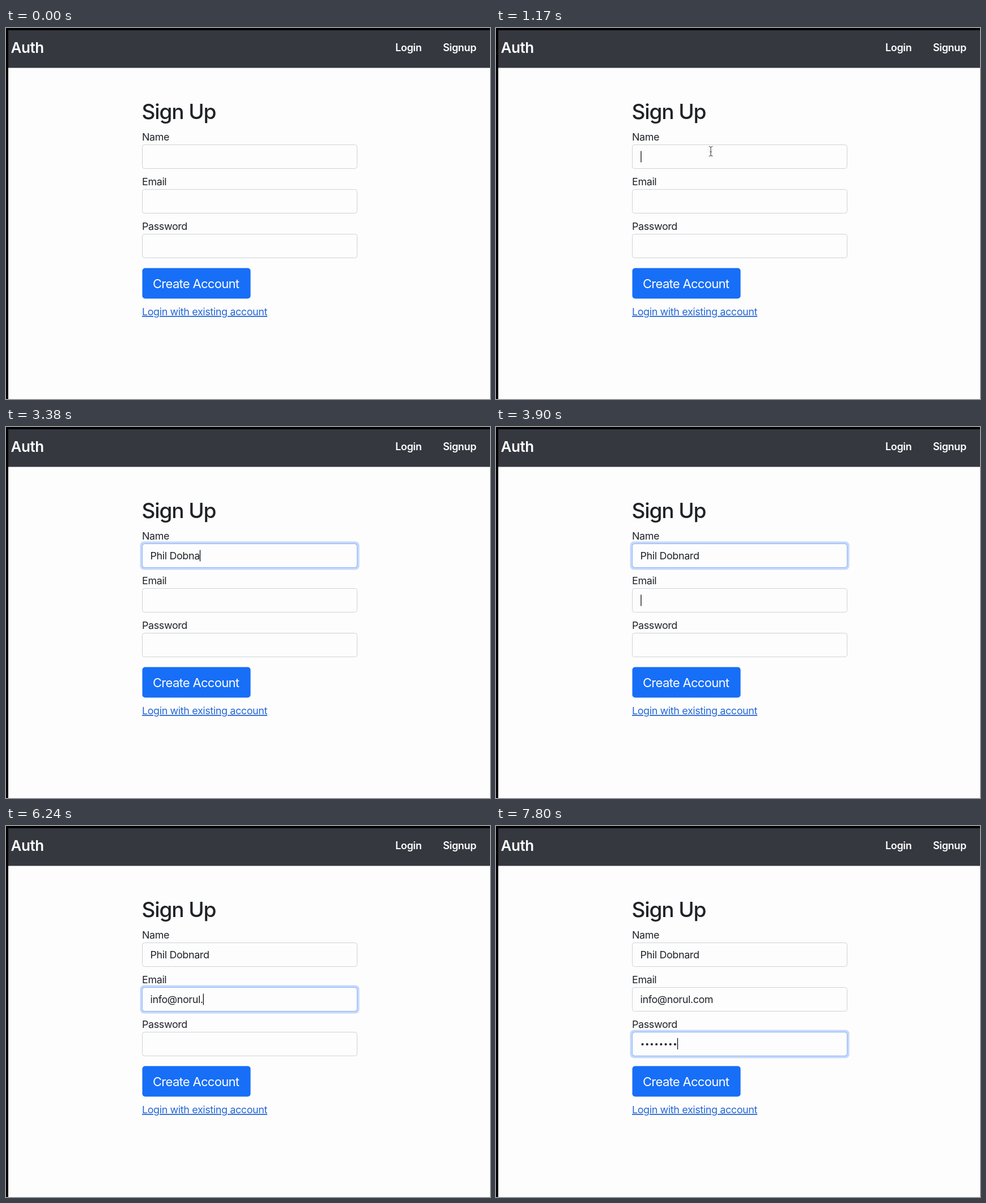
These frames come from a looping animation (854 by 656 pixels, 8000 ms). An HTML page:

```html
<!DOCTYPE html>
<html lang="en">
<head>
<meta charset="utf-8">
<title>Sign Up</title>
<style>
  html, body { margin: 0; width: 100%; height: 100%; overflow: hidden; background: #fdfdfd; }
  svg { display: block; width: 854px; height: 656px; }
  text { font: 400 17.9px Inter, "Open Sans", sans-serif; letter-spacing: -.36px; fill: #1f2328; white-space: pre; }
  .brand { font-size: 26px; font-weight: 600; letter-spacing: -.4px; fill: #fff; }
  .nav { font-size: 18px; font-weight: 600; fill: #fff; }
  .title { font-size: 37px; font-weight: 500; letter-spacing: -1.1px; }
  .button { font-size: 22px; letter-spacing: -.7px; fill: #fff; }
  .link { fill: #2367d6; text-decoration: underline; }
</style>
</head>
<body>
<svg id="stage" viewBox="0 0 854 656">
  <rect width="854" height="656" fill="#fdfdfd"/>
  <rect width="854" height="4" fill="#000"/>
  <rect width="4" height="656" fill="#000"/>
  <rect x="4" y="4" width="850" height="66.5" fill="#35383f"/>
  <text class="brand" x="8.5" y="44">Auth</text>
  <text class="nav" x="687" y="41">Login</text>
  <text class="nav" x="771" y="41">Signup</text>
  <text class="title" x="239.5" y="161">Sign Up</text>
  <g id="form"></g>
  <rect x="240.5" y="424.5" width="191" height="54" rx="5" fill="#176ef7"/>
  <text class="button" x="259" y="460">Create Account</text>
  <text class="link" x="240" y="508">Login with existing account</text>
  <rect id="caret" width="1.3" fill="#111"/>
  <g id="pointer">
    <path id="arrow" d="M0 0V17L4 13.4L6.6 19.4L9.4 18.2L6.8 12.4H12.2Z" fill="#000" stroke="#fff" stroke-width="1.2"/>
    <path id="beam" d="M-3.5 -8.5Q0 -8.5 0 -6Q0 -8.5 3.5 -8.5M0 -6V6M-3.5 8.5Q0 8.5 0 6Q0 8.5 3.5 8.5M-2 1H2" fill="none" stroke="#555" stroke-width="1.2"/>
  </g>
</svg>
<script>
const LOOP = 8000, STEP = 130, FADE = 130, BLINK = 520;
const $ = id => document.getElementById(id);

function add(tag, attrs, text = "") {
  const el = document.createElementNS("http://www.w3.org/2000/svg", tag);
  for (const key in attrs) el.setAttribute(key, attrs[key]);
  el.textContent = text;
  return $("form").appendChild(el);
}

// keys: [time, number of characters typed so far]
const fields = [
  { label: "Name", top: 206, value: "Phil Dobnard", from: 1170, to: 3900,
    keys: [[2210, 1], [2340, 2], [2470, 3], [2600, 4], [2730, 5], [2990, 6],
           [3120, 7], [3250, 9], [3380, 10], [3510, 11], [3640, 12]] },
  { label: "Email", top: 285, value: "info@norul.com", from: 3900, to: 6760,
    keys: [[4680, 1], [4940, 2], [5070, 3], [5200, 4], [5460, 5], [5720, 6],
           [5850, 8], [5980, 10], [6240, 11], [6370, 12], [6500, 13], [6630, 14]] },
  { label: "Password", top: 364, secret: true, from: 6760, to: 9000,
    keys: [[7020, 1], [7280, 2], [7410, 4], [7540, 5], [7670, 7], [7800, 8]] }
];

for (const f of fields) {
  const box = { x: 240.5, y: f.top + .5, width: 379, height: 42, rx: 4 };
  f.ring = add("rect", { x: 236.5, y: f.top - 3.5, width: 387, height: 50, rx: 7, fill: "#c5d8fc" });
  add("rect", { ...box, fill: "#fdfdfd", stroke: "#cfd2d7" });
  f.edge = add("rect", { ...box, fill: "none", stroke: "#8db4f5" });
  add("text", { x: 240, y: f.top - 7 }, f.label);
  if (f.secret) {
    f.dots = Array.from({ length: 8 }, (_, i) =>
      add("circle", { cx: 258.5 + i * 8.2, cy: f.top + 22, r: 2.1, fill: "#1f2328" }));
  } else {
    f.text = add("text", { x: 254.5, y: f.top + 28 });
  }
}

const clamp = v => Math.max(0, Math.min(1, v));

function drawField(f, t) {
  const focus = clamp((t - f.from) / FADE) * (1 - clamp((t - f.to) / FADE));
  f.ring.setAttribute("opacity", focus);
  f.edge.setAttribute("opacity", focus);

  const [last, count] = f.keys.filter(k => k[0] <= t).pop() || [f.from, 0];
  let end = 255.3;
  if (f.secret) {
    f.dots.forEach((d, i) => d.setAttribute("opacity", i < count ? 1 : 0));
    if (count) end = 254.2 + count * 8.2;
  } else {
    f.text.textContent = f.value.slice(0, count);
    if (count) end = 254.5 + f.text.getComputedTextLength();
  }

  if (t >= f.from && t < f.to) {
    const on = Math.floor((t - last) / BLINK) % 2 === 0;
    const caret = $("caret");
    caret.setAttribute("x", end);
    caret.setAttribute("y", f.top + (f.secret ? 11 : 11.5));
    caret.setAttribute("height", 20);
    caret.setAttribute("opacity", on ? 1 : 0);
  }
}

function drawPointer(t) {
  const p = 1 - (1 - clamp(t / 1040)) ** 2;
  const x = 500 - 121 * p, y = 675 - 457 * p;
  const overField = fields.some(f => y > f.top && y < f.top + 43);
  $("pointer").setAttribute("transform", `translate(${x} ${y})`);
  $("pointer").setAttribute("opacity", t < 2600 ? 1 : 0);
  $("arrow").setAttribute("opacity", overField ? 0 : 1);
  $("beam").setAttribute("opacity", overField ? 1 : 0);
}

function frame() {
  const t = Math.floor((performance.now() % LOOP) / STEP) * STEP;
  $("caret").setAttribute("opacity", 0);
  fields.forEach(f => drawField(f, t));
  drawPointer(t);
  requestAnimationFrame(frame);
}
frame();
</script>
</body>
</html>
```
